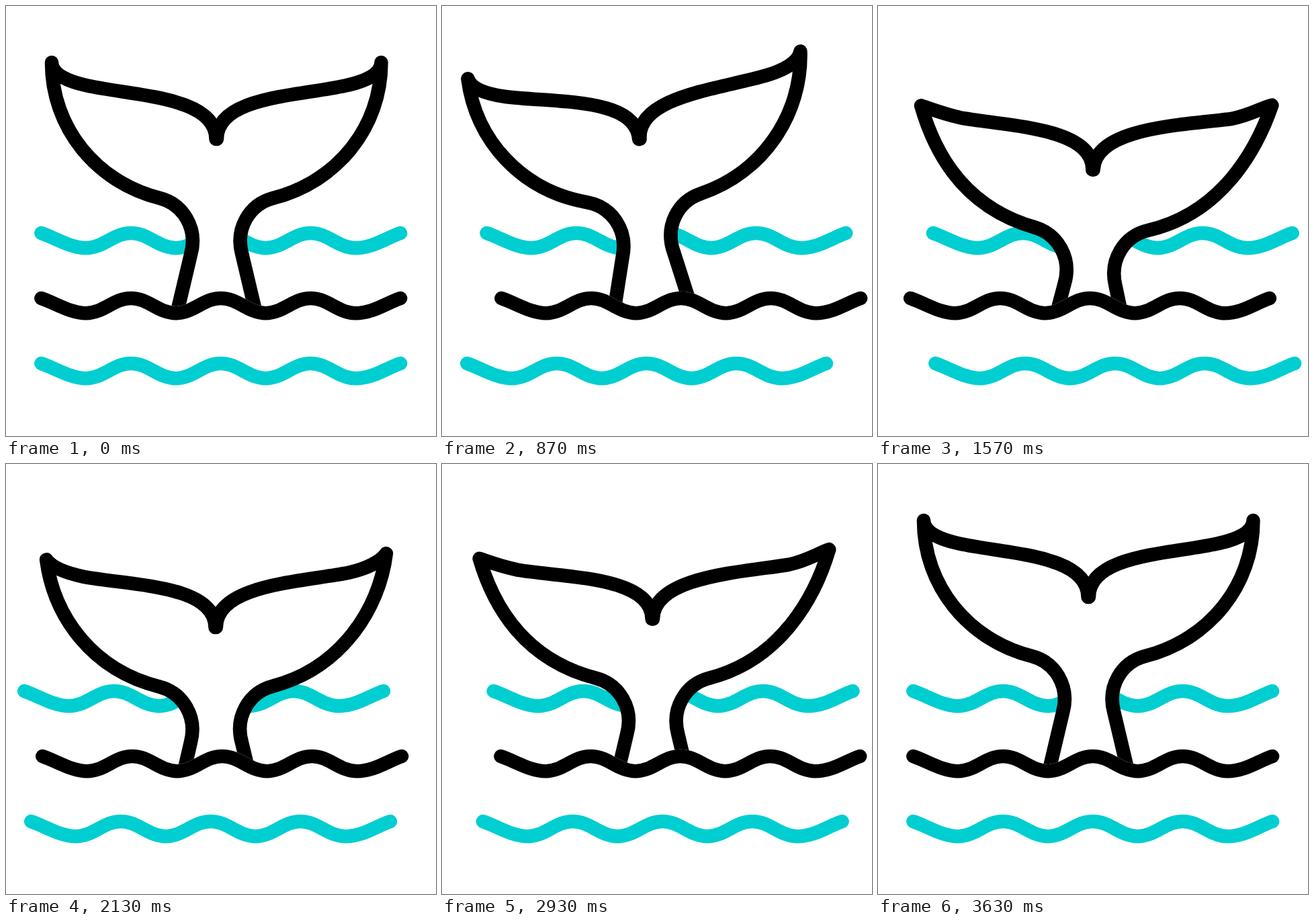
An HTML page that plays this animation: 640x640 px, repeating every 3.83 s.

```html
<!DOCTYPE html>
<html lang="en">
<head>
<meta charset="utf-8">
<title>Whale tail</title>
<style>
  html, body { margin: 0; width: 100%; height: 100%; overflow: hidden; background: #fff; }
  svg { display: block; width: 100vw; height: 100vh; }
  path { stroke-width: 20.6; stroke-linecap: round; stroke-linejoin: round; fill: none; }
  .sea { stroke: #00ced1; }
  .ink { stroke: #000; }
  .white { fill: #fff; }
  #cover { stroke: #fff; }
</style>
</head>
<body>
<svg viewBox="0 0 640 640">
  <path id="far" class="sea"/>
  <path id="tail" class="ink white"/>
  <g id="mid">
    <path id="cover" class="white"/>
    <path id="swell" class="ink"/>
  </g>
  <path id="near" class="sea"/>
</svg>
<script>
const LOOP = 3830, RATE = 0.03; // ticks per ms
const CENTRE = 313.2, PIVOT = 452;
const $ = id => document.getElementById(id);
const smooth = p => p * p * (3 - 2 * p);

// Eases between [tick, value] keys
function follow(keys, tick) {
  const next = keys.findIndex(([t]) => t > tick);
  if (next < 0) return keys[keys.length - 1][1];
  if (next === 0) return keys[0][1];
  const [t0, a] = keys[next - 1], [t1, b] = keys[next];
  return a + (b - a) * smooth((tick - t0) / (t1 - t0));
}

// Five even swings right and left, then back to rest
function sway(start, end) {
  const swings = Array.from({ length: 5 }, (_, i) => [start + 15 * (i + 1), i % 2 ? -26 : 36]);
  return [[start, 0], ...swings, [end, 0]];
}

const waves = { far: sway(5, 101), mid: sway(11, 107), near: sway(0, 94) };
const drop = [[0, 0], [12, 78], [30, -12], [54.7, 63], [75, 22], [92, 34.5], [109, 0]];
const tilt = [[0, 0], [12, 6.2], [30, -5.9], [50, 2], [74, -1.6], [90, 0.1], [109, 0]];
const bend = [0, 15, 30, 51, 75, 92, 109].map((t, i) => [t, i % 2]);

function wave(y) {
  const x = 52.4, half = 66.83, h = 26, low = y + 22.2, slope = y + 7.5;
  let d = `M${x} ${y}C${x + 22} ${slope} ${x + half - 23} ${low} ${x + half} ${low}`;
  for (let i = 2; i < 8; i++) {
    const end = x + half * i, [from, to] = i % 2 ? [y, low] : [low, y];
    d += `C${end - half + h} ${from} ${end - h} ${to} ${end} ${to}`;
  }
  return d + `S${x + half * 8 - 22} ${slope} ${x + half * 8} ${y}`;
}

// Left half from the leg round the tip to the notch; k bends the tip by (dx, dy)
function half(k, dx, dy) {
  const foot = [239.5, 520], shin = [275, 370];
  const x = 68 + dx * k, y = 84 + dy * k;
  const rx = 121 + 0.6 * dx * k, ry = 118.5 + (0.6 * dy - 9) * k;
  return [
    foot, foot, shin, shin,
    [286, 330], [263, 295], [229, 286],
    [134 - 14 * k, 262 - 4 * k], [x + 24 * k, y + 97 - 31 * k], [x, y],
    [x + 20 * k, y + 18 - 14 * k], [rx - 28, ry - 6], [rx, ry],
    [rx + 72, ry + 15.7 - 5 * k], [312.5, 135], [312.5, 198]
  ];
}

const curve = pts => pts[0] + 'C' + pts.slice(1).join(' ');

function tailPath(k) {
  const right = half(k, -20.5, 12).reverse().map(([x, y]) => [2 * CENTRE - x, y]);
  return 'M' + curve(half(k, -14.5, 28)) + 'L' + curve(right);
}

$('far').setAttribute('d', wave(338));
$('near').setAttribute('d', wave(532));
$('swell').setAttribute('d', wave(435));
$('cover').setAttribute('d', wave(435) + 'V700H52Z');

function draw(ms) {
  const tick = Math.floor((ms % LOOP + 4) * RATE);
  for (const id in waves)
    $(id).setAttribute('transform', `translate(${follow(waves[id], tick)} 0)`);
  $('tail').setAttribute('d', tailPath(follow(bend, tick)));
  $('tail').setAttribute('transform',
    `translate(0 ${follow(drop, tick)}) rotate(${follow(tilt, tick)} ${CENTRE} ${PIVOT})`);
}

const begin = performance.now();
function loop(now) {
  draw(Math.max(0, now - begin));
  requestAnimationFrame(loop);
}
draw(0);
requestAnimationFrame(loop);
</script>
</body>
</html>
```
